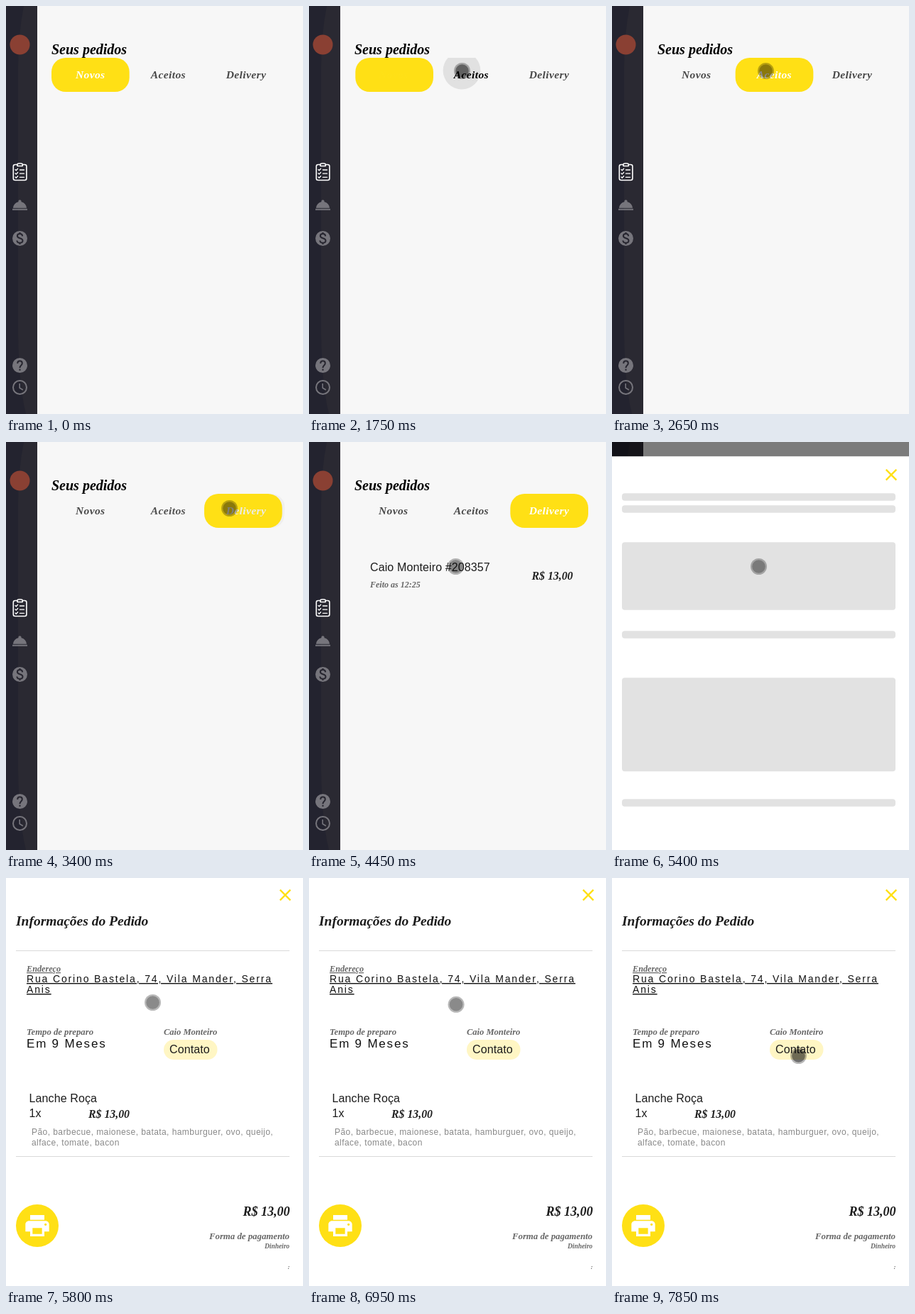
These frames come from a looping animation (418 px wide and 575 px high, 8000 ms). An HTML page:

```html
<!DOCTYPE html>
<html lang="pt">
<head>
<meta charset="utf-8">
<title>Seus pedidos</title>
<style>
html, body { margin: 0; height: 100%; overflow: hidden; background: #f7f7f7; }
svg { display: block; width: 100vw; height: 100vh; font-family: "Liberation Sans", Arial, sans-serif; }
.s { font-family: "Liberation Serif", "Times New Roman", serif; font-weight: bold; font-style: italic; }
.b { font-size: 16px; letter-spacing: .12px; fill: #1c1c1c; }
.g { fill: #666; }
.tab { font-size: 15.5px; letter-spacing: .4px; text-anchor: middle; }
.r { text-anchor: end; }
.addr { font-size: 14px; letter-spacing: 1.85px; fill: #111; text-decoration: underline; text-decoration-color: #551a8b; }
.note { font-size: 12px; letter-spacing: .43px; fill: #888; }
.icon { fill: #76757c; }
</style>
</head>
<body>
<svg viewBox="0 0 418 575" preserveAspectRatio="none">
  <defs>
    <clipPath id="c0"><rect x="174" y="73" width="109" height="48"/></clipPath>
    <clipPath id="c1"><rect x="283" y="73" width="110" height="48" rx="20"/></clipPath>
    <clipPath id="c2"><rect x="60" y="145" width="337" height="85"/></clipPath>
  </defs>
  <rect width="418" height="575" fill="#f7f7f7"/>

  <!-- sidebar -->
  <rect width="44" height="575" fill="#23232f"/>
  <path d="M25 0Q17 40 17 90V450Q17 530 28 575H44V0z" fill="#2a2932"/>
  <circle cx="19.5" cy="54.5" r="14" fill="#8a4033"/>
  <g fill="none" stroke="#fff" stroke-width="1.6" stroke-linecap="round" stroke-linejoin="round">
    <rect x="10.3" y="223.5" width="18.6" height="22" rx="2.5"/>
    <path d="M16 225.5v-2.5q0-1.3 3.6-1.3t3.6 1.3v2.5z" fill="#2a2932"/>
    <path d="M13 230.5l1.3 1.3 2.3-2.6M13 235.8l1.3 1.3 2.3-2.6M13 241l1.3 1.3 2.3-2.6M19.5 231h6M19.5 236.2h6M19.5 241.4h6" stroke-width="1.3"/>
  </g>
  <g class="icon">
    <path transform="translate(6.9 267.9) scale(1.05)" d="M2 17h20v2H2zm11.84-9.21c.1-.24.16-.51.16-.79 0-1.1-.9-2-2-2s-2 .9-2 2c0 .28.06.55.16.79C6.25 8.6 3.27 11.93 3 16h18c-.27-4.07-3.25-7.4-7.16-8.21z"/>
    <circle cx="19.5" cy="327.5" r="10.5"/>
    <circle cx="19.5" cy="506.5" r="10.5"/>
  </g>
  <g fill="none" stroke="#26252f" stroke-width="2">
    <path d="M23.2 324.3q-.4-3.2-3.7-3.2-3.6 0-3.6 2.9 0 2.3 3.6 3.2 4 1 4 3.5 0 3.1-4 3.1-3.9 0-4.1-3.3M19.5 319v2.5M19.5 333.5v2.6"/>
    <path d="M16.2 503.7q0-3.4 3.3-3.4t3.3 3.2q0 1.5-1.6 2.9-1.7 1.4-1.7 3.6M19.5 511.6v2.2"/>
  </g>
  <g fill="none" stroke="#76757c" stroke-width="2">
    <circle cx="19.5" cy="537.5" r="9.5"/>
    <path d="M19.2 532v6.2l4.6 2.8" stroke-width="1.6"/>
  </g>

  <!-- orders -->
  <g id="panels">
    <rect x="54" y="63" width="353" height="72" rx="24" fill="#e9e9ea"/>
    <rect x="64" y="73" width="329" height="48" rx="20" fill="#fff"/>
    <rect x="64" y="151" width="329" height="73" rx="18" fill="#fff"/>
  </g>
  <text class="s" x="64" y="68" font-size="20">Seus pedidos</text>
  <g id="ripples"></g>
  <rect id="pill" y="73" width="109.67" height="48" rx="20" fill="#ffe015"/>
  <g id="tabs"></g>
  <g id="card">
    <text class="b" x="86" y="182">Caio Monteiro #208357</text>
    <text class="s g" x="86" y="205" font-size="12">Feito as 12:25</text>
    <text class="s r" x="371.5" y="194" font-size="15.8" fill="#222">R$ 13,00</text>
  </g>

  <!-- order sheet -->
  <rect id="shade" width="418" height="575"/>
  <g id="sheet">
    <rect y="-37" width="418" height="37" fill-opacity=".045"/>
    <rect width="418" height="575" fill="#fff"/>
    <path id="close" d="M-7.3-7.3L7.3 7.3M7.3-7.3L-7.3 7.3" stroke="#ffe015" stroke-width="2.4"/>
    <g id="bones" fill="#e2e2e2"></g>
    <g id="info">
      <text class="s" x="14" y="67" font-size="19.5" fill="#1c1c1c">Informações do Pedido</text>
      <path d="M14 102.5H399M14 392.5H399" stroke="#d9d9d9"/>
      <text class="s g" x="29" y="132" font-size="12.2" text-decoration="underline">Endereço</text>
      <text class="addr" x="29" y="147">Rua Corino Bastela, 74, Vila Mander, Serra</text>
      <text class="addr" x="29" y="162">Anis</text>
      <text class="s g" x="29" y="221" font-size="12.7">Tempo de preparo</text>
      <text x="29" y="239" font-size="17" letter-spacing="1.8" fill="#111">Em 9 Meses</text>
      <text class="s g" x="222" y="221" font-size="12.5">Caio Monteiro</text>
      <rect x="222" y="228" width="75.5" height="28" rx="14" fill="#fff6c4"/>
      <text class="b" x="230" y="247">Contato</text>
      <text class="b" x="32.5" y="316">Lanche Roça</text>
      <text class="b" x="32.5" y="337">1x</text>
      <text class="s" x="116" y="337.5" font-size="15.8" fill="#222">R$ 13,00</text>
      <text class="note" x="36" y="362">Pão, barbecue, maionese, batata, hamburguer, ovo, queijo,</text>
      <text class="note" x="36" y="377">alface, tomate, bacon</text>
      <circle cx="44" cy="490" r="30" fill="#ffe015"/>
      <path transform="translate(24 470) scale(1.667)" fill="#fff" d="M19 8H5c-1.66 0-3 1.34-3 3v6h4v4h12v-4h4v-6c0-1.66-1.34-3-3-3zm-3 11H8v-5h8v5zm3-7c-.55 0-1-.45-1-1s.45-1 1-1 1 .45 1 1-.45 1-1 1zm-1-9H6v4h12V3z"/>
      <text class="s r" x="399.5" y="476" font-size="18" fill="#1c1c1c">R$ 13,00</text>
      <text class="s g r" x="399" y="509" font-size="12.8">Forma de pagamento</text>
      <text class="s g r" x="399" y="522" font-size="9.4">Dinheiro</text>
      <text class="s g r" x="399.5" y="551" font-size="9">:</text>
    </g>
  </g>

  <g id="cursor">
    <circle r="11.5" fill-opacity=".28"/>
    <circle id="core" r="9.3"/>
  </g>
</svg>
<script>
const $ = id => document.getElementById(id);
const add = (parent, tag, attrs) => {
  const el = document.createElementNS('http://www.w3.org/2000/svg', tag);
  for (const k in attrs) el.setAttribute(k, attrs[k]);
  return parent.appendChild(el);
};
const show = (id, on) => $(id).style.display = on ? '' : 'none';
const clamp = v => Math.max(0, Math.min(1, v));

// cubic-bezier(x1, 0, .2, 1)
const bezier = x1 => v => {
  v = clamp(v);
  let lo = 0, hi = 1, s = .5;
  for (let i = 0; i < 24; i++) {
    s = (lo + hi) / 2;
    const x = 3 * (1 - s) ** 2 * s * x1 + 3 * (1 - s) * s * s * .2 + s ** 3;
    if (x < v) lo = s; else hi = s;
  }
  return 3 * (1 - s) * s * s + s ** 3;
};
const inOut = bezier(.4), out = bezier(0);

const LOOP = 8000, PICK = [1730, 3175], OPEN = 5214.5, LOADED = 5800, TAB = 109.67;

const tabs = ['Novos', 'Aceitos', 'Delivery'].map((name, i) => {
  const el = add($('tabs'), 'text', { class: 's tab', x: 118.7 + TAB * i, y: 102 });
  el.textContent = name;
  return el;
});

for (const [y, h] of [[52, 10.5], [69, 10.5], [121, 95.5], [246, 10.5], [312, 132], [483, 10.5]])
  add($('bones'), 'rect', { x: 14, y, width: 385, height: h, rx: 4 });

// x, y, full radius, start, release
const ripples = [
  [215, 91, 76, 1590, 1730],
  [314.5, 93.5, 85, 3040, 3175],
  [206.5, 175.5, 196, 5090, 5222]
].map(([cx, cy, r, start, release], i) => {
  const g = add($('ripples'), 'g', { 'clip-path': `url(#c${i})` });
  return { el: add(g, 'circle', { cx, cy }), r, start, release };
});

// visible stretches of the pointer: from, to, x, y [, end x, end y]
const moves = [
  [850, 1200, 29, 47, 169.5, 80.5],
  [1350, 2650, 215.5, 91.5],
  [2650, 2750, 215.5, 91.5, 314.5, 93.5],
  [2750, 4000, 314.5, 93.5],
  [4000, 4050, 289, 116.5],
  [4200, 4250, 240.5, 161.5],
  [4450, 6950, 206.5, 175.5],
  [6950, 7050, 206.5, 175.5, 263, 453.5],
  [7200, 7750, 258.5, 250.5],
  [7750, 8000, 262.5, 250.5]
];
const presses = [[1550, 1770], [3000, 3190], [4950, 5300], [7800, 8000]];
const within = t => ([a, b]) => t >= a && t < b;

function draw(t) {
  const pos = PICK.reduce((sum, s) => sum + inOut((t - s) / 300), 0);
  const picked = PICK.filter(s => t >= s).length;
  $('pill').setAttribute('x', 64 + TAB * pos);
  tabs.forEach((el, i) => {
    const w = Math.max(0, 1 - Math.abs(pos - i)), v = Math.round(255 * w * w);
    el.setAttribute('fill', `rgb(${v},${v},${v})`);
    el.setAttribute('opacity', i === picked ? 1 : .7 * (1 - w));
  });

  for (const { el, r, start, release } of ripples) {
    el.setAttribute('r', r * inOut((t - start) / 550));
    el.setAttribute('opacity', .09 * (1 - inOut((t - release) / 550)));
  }

  show('card', t >= 3500);
  show('panels', t >= 5150);

  const open = (t - OPEN) / 248;
  $('shade').setAttribute('opacity', .5 * inOut(open));
  show('sheet', open > 0);
  $('sheet').setAttribute('transform', `translate(0 ${575 * (1 - out(open))})`);
  $('close').setAttribute('transform', `translate(393 ${t < LOADED ? 26 : 24})`);
  show('bones', t < LOADED);
  show('info', t >= LOADED);

  const m = moves.find(within(t));
  show('cursor', m);
  if (m) {
    const [a, b, x, y, x2 = x, y2 = y] = m, k = (t - a) / (b - a);
    $('cursor').setAttribute('transform', `translate(${x + (x2 - x) * k} ${y + (y2 - y) * k})`);
    $('core').setAttribute('fill-opacity', presses.some(within(t)) ? .4 : .25);
  }
}

function tick(now) {
  draw(now % LOOP);
  requestAnimationFrame(tick);
}
draw(0);
requestAnimationFrame(tick);
</script>
</body>
</html>
```
